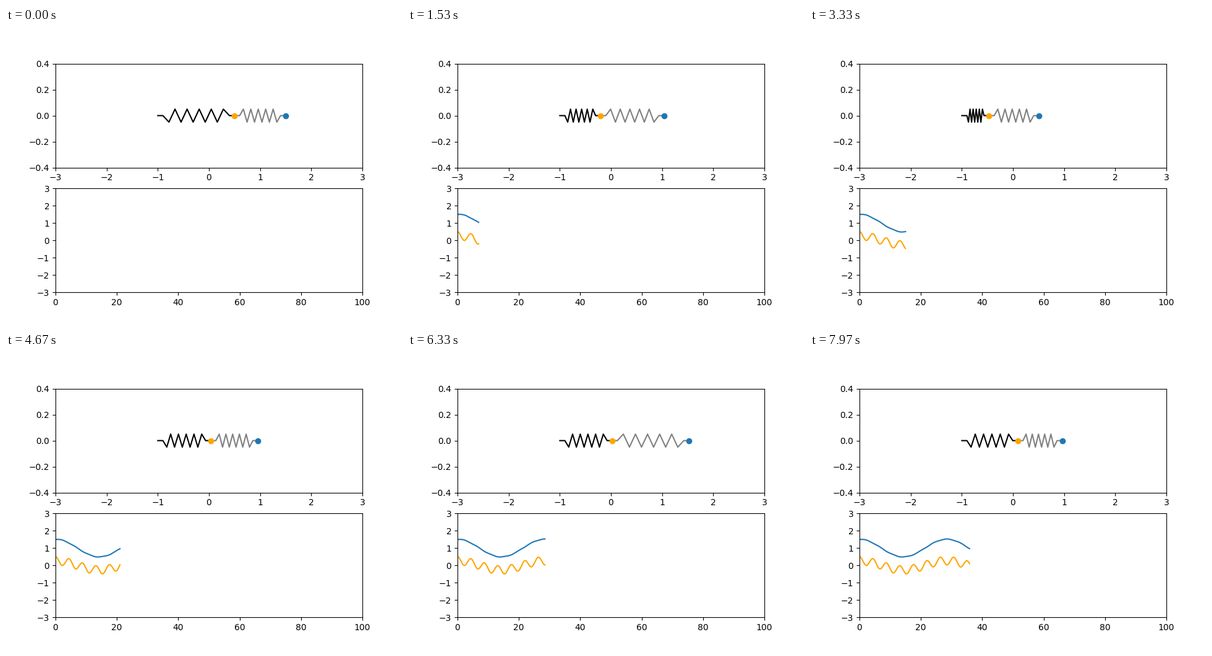
These frames come from a looping animation (640 by 480 pixels, 8000 ms). A matplotlib script:

```python
import matplotlib.pyplot as plt
import numpy as np
from matplotlib.animation import FuncAnimation

FRAMES = 320
INTERVAL = 25
STEPS = 240     # simulation steps shown in one loop
DT = 0.15

# Two masses in a row: wall - spring - mass 1 - spring - mass 2
K1, K2 = 1.0, 1.0
M1, M2 = 1.0, 10.0
WALL = -1.0
REST = np.array([0.0, 1.0])
START = np.array([0.5, 1.5])


def solve(t):
    """Positions of both masses at times t, released from rest."""
    stiff = np.array([[(K1 + K2) / M1, -K2 / M1],
                      [-K2 / M2, K2 / M2]])
    w2, modes = np.linalg.eig(stiff)
    amps = np.linalg.solve(modes, START - REST)
    waves = amps[:, None] * np.cos(np.sqrt(w2)[:, None] * t)
    return REST[:, None] + modes @ waves


def spring(left, right, sign, end=0.1, height=0.05, teeth=10):
    """Zigzag between two points with a straight piece at each end."""
    x = np.r_[left, np.linspace(left + end, right - end, teeth + 2), right]
    y = np.zeros(teeth + 4)
    y[2:-2] = sign * height * (-1.0) ** np.arange(teeth)
    return x, y


t = np.arange(STEPS) * DT
x1, x2 = solve(t)

fig, (top, low) = plt.subplots(2, 1, figsize=(6.4, 4.8), dpi=100)
top.set(xlim=(-3, 3), ylim=(-0.4, 0.4))
low.set(xlim=(0, 100), ylim=(-3, 3))

spring1, = top.plot([], [], color="black")
spring2, = top.plot([], [], color="gray")
mass1, = top.plot([], [], "o", color="orange")
mass2, = top.plot([], [], "o", color="tab:blue")
trace1, = low.plot([], [], color="orange")
trace2, = low.plot([], [], color="tab:blue")


def update(frame):
    # nearest simulation step, halves rounded up
    i = int(frame * STEPS / FRAMES + 0.5)
    a, b = x1[i], x2[i]
    spring1.set_data(*spring(WALL, a, -1))
    spring2.set_data(*spring(a, b, 1))
    mass1.set_data([a], [0])
    mass2.set_data([b], [0])
    trace1.set_data(t[:i + 1], x1[:i + 1])
    trace2.set_data(t[:i + 1], x2[:i + 1])
    return spring1, spring2, mass1, mass2, trace1, trace2


anim = FuncAnimation(fig, update, frames=FRAMES, interval=INTERVAL,
                     repeat=True, repeat_delay=0)
plt.show()
```
